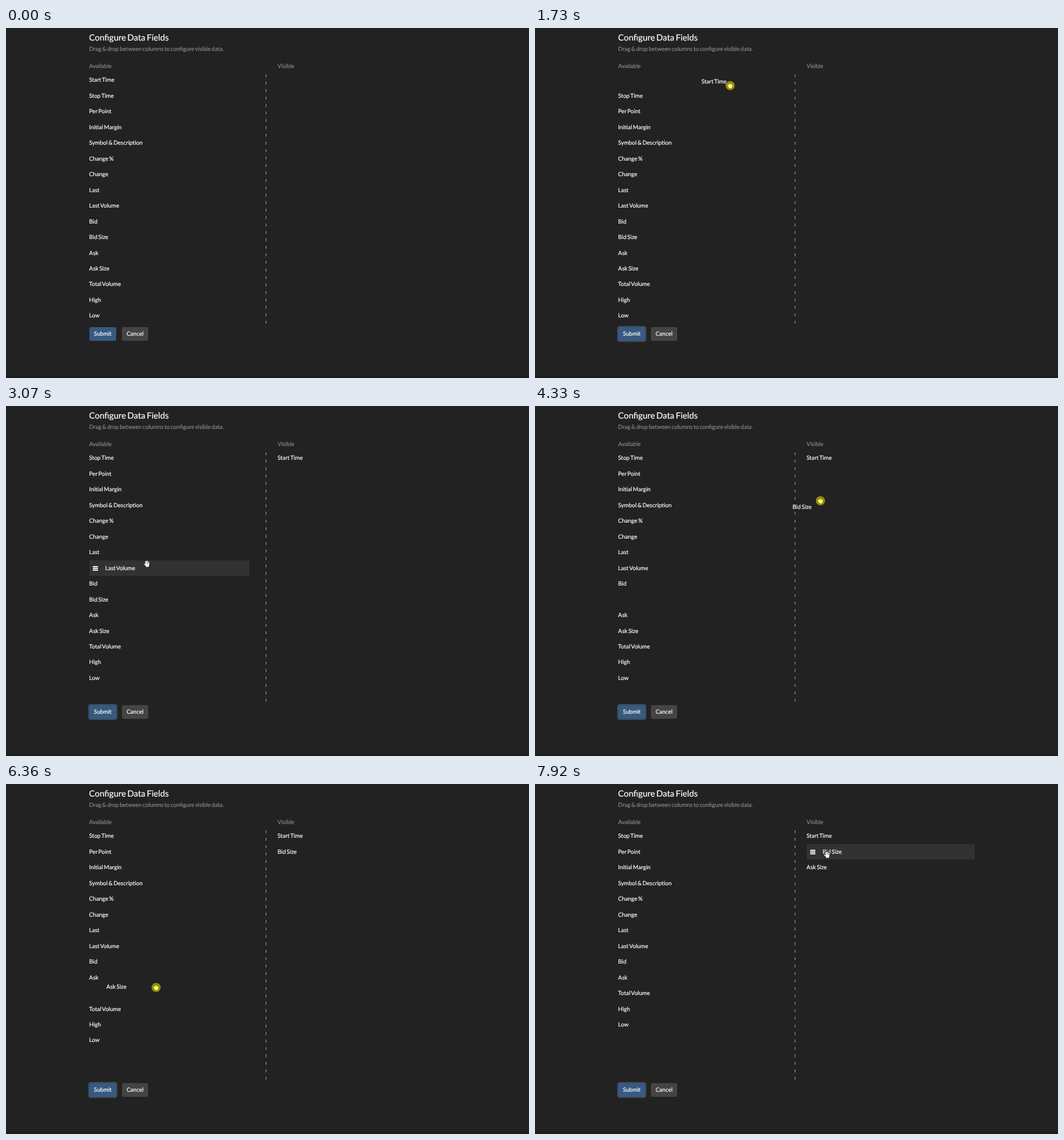
An HTML page that plays this animation: 916 px wide and 612 px high, repeating every 8 s.

```html
<!DOCTYPE html>
<html lang="en">
<head>
<meta charset="utf-8">
<title>Configure Data Fields</title>
<style>
html, body { margin: 0; width: 100%; height: 100%; overflow: hidden; background: #222; }
#stage {
  position: relative; width: 916px; height: 612px; overflow: hidden;
  background: linear-gradient(#222 607px, #1d1d1d 608px);
  color: #fff; font: 10.05px/20px Lato, sans-serif; word-spacing: -.1em;
  -webkit-text-stroke: .2px; text-rendering: geometricPrecision; white-space: nowrap;
}
#stage > * { position: absolute; }
h1 { left: 145.5px; top: 6.5px; margin: 0; font-size: 15.07px; font-weight: 400; word-spacing: -.1em; }
.muted { left: 145.6px; top: 57px; color: #888; }
.hint { top: 27px; }
.right { left: 475.6px; }
.divider {
  left: 455px; top: 81px; width: 1px; height: 436px;
  background: repeating-linear-gradient(#aaa 0 5px, transparent 5px 13.06px);
}
.btn {
  top: 523px; height: 23.5px; line-height: 24px; border-radius: 2.7px;
  text-align: center; background: #444;
}
.submit { left: 146px; width: 47px; background: #375a7f; }
.cancel { left: 203px; width: 46px; }
.focus { box-shadow: 0 0 0 2.1px rgba(85, 115, 146, .5); }
.row { height: 27.47px; line-height: 29.47px; box-sizing: border-box; }
.row.hover { background: #323232; padding-left: 28.2px; }
.row.hover::before {
  content: ""; position: absolute; left: 6.6px; top: 10px; width: 9px; height: 8px;
  background: repeating-linear-gradient(#fff 0 2px, transparent 2px 3px);
}
.row.ghost { z-index: 2; }
#pointer { left: 0; top: 0; z-index: 3; overflow: visible; -webkit-text-stroke: 0; }
#pointer .edge { stroke: #000; stroke-width: 2.9; }
#pointer .skin { stroke: #fff; stroke-width: 1.5; fill: #fff; }
</style>
</head>
<body>
<div id="stage">
  <h1>Configure Data Fields</h1>
  <div class="muted hint">Drag &amp; drop between columns to configure visible data.</div>
  <div class="muted">Available</div>
  <div class="muted right">Visible</div>
  <div class="divider"></div>
  <div class="btn submit">Submit</div>
  <div class="btn cancel">Cancel</div>
  <svg id="pointer" width="1" height="1" stroke-linecap="round" stroke-linejoin="round">
    <defs>
      <path id="open" d="M-2.5 -3.8L-1.7 1M-.5 -5V1M1.6 -4.7V1M3.9 -3.2L3.4 1M-4.7 .4L-2.2 3M-2 1H3.6L2.8 5H-1Z"/>
      <path id="fist" d="M-2.7 -2V1M-.8 -2.8V1M1.2 -2.8V1M3.2 -2V1M-3.8 .6L-2 2.6M-2.4 0H3.2L2.4 3.8H-1.3Z"/>
    </defs>
    <path class="arrow" d="M0 0V10.8L2.5 8.5L4.2 12.4L6 11.6L4.3 7.8H7.6Z" fill="#fff" stroke="#000" stroke-width=".6"/>
    <g class="open"><use href="#open" class="edge"/><use href="#open" class="skin"/></g>
    <g class="fist">
      <use href="#fist" class="edge"/><use href="#fist" class="skin"/>
      <circle r="8" fill="#fff800" fill-opacity=".5"/>
    </g>
  </svg>
</div>
<script>
const LOOP = 8000, ENTER = 70, SETTLE = 250, GRIP = 2.5;
const TOP = 77.35, PITCH = 27.47;
const COLS = [{ x: 145.6, w: 280.4 }, { x: 475.6, w: 294.4 }];
const FIELDS = ['Start Time', 'Stop Time', 'Per Point', 'Initial Margin', 'Symbol & Description',
  'Change %', 'Change', 'Last', 'Last Volume', 'Bid', 'Bid Size', 'Ask', 'Ask Size',
  'Total Volume', 'High', 'Low'];

const DRAGS = [
  { item: 0, press: 1330, start: 1400, drop: 2220 },
  { item: 10, press: 3710, start: 3900, drop: 4770 },
  { item: 12, press: 6230, start: 6280, drop: 7070 }
];

// Where the pointer turns or rests: arrival, x, y, departure if it rests
const STOPS = [
  [ENTER, 836, 580], [470, 195, 172, 710], [860, 187, 114.5], [1120, 193, 98, 1310],
  [2110, 535, 105], [2360, 549.5, 109.5], [3070, 247, 275.5], [3460, 192, 327, 3850],
  [4330, 499.5, 166], [4770, 548, 108], [5580, 292, 309], [6060, 229, 367, 6200],
  [6360, 262.5, 356], [7000, 540, 150], [7280, 557, 148], [7850, 518, 128], [7920, 511.5, 123.5, LOOP]
];
const path = STOPS.flatMap(([t, x, y, leave]) => leave ? [[t, x, y], [leave, x, y]] : [[t, x, y]]);

const stage = document.getElementById('stage');
const pointer = document.getElementById('pointer');
const submit = stage.querySelector('.submit');
const shapes = ['arrow', 'open', 'fist'].map(n => pointer.querySelector('.' + n));
const clamp = v => Math.min(Math.max(v, 0), 1);
const rowTop = n => TOP + n * PITCH;

const rows = FIELDS.map(name => {
  const el = document.createElement('div');
  el.textContent = name;
  stage.append(el);
  return el;
});

// Velocity along one axis; zero at rests and turning points
function slope(i, k) {
  const p = path[i], a = path[i - 1] || p, b = path[i + 1] || p;
  const inner = a !== p && b !== p;
  return inner && (b[k] - p[k]) * (p[k] - a[k]) <= 0 ? 0 : (b[k] - a[k]) / (b[0] - a[0]);
}

function pointAt(t) {
  const i = Math.max(path.findIndex(p => p[0] > t) - 1, 0);
  const a = path[i], b = path[i + 1], d = b[0] - a[0], s = clamp((t - a[0]) / d);
  const at = k => {
    const m = slope(i, k) * d, n = slope(i + 1, k) * d, gap = b[k] - a[k];
    return a[k] + s * (m + s * (3 * gap - 2 * m - n + s * (m + n - 2 * gap)));
  };
  return { x: at(1), y: at(2) };
}

// The label keeps its distance from the pointer, then eases into its slot
function ghostAt(drag, t, from, to) {
  const held = pointAt(drag.press), now = pointAt(Math.min(t, drag.drop));
  const x = COLS[0].x + now.x - held.x - GRIP, y = rowTop(from) + now.y - held.y;
  const k = 1 - (1 - clamp((t - drag.drop) / SETTLE)) ** 3;
  return { x: x + (COLS[1].x - x) * k, y: y + (rowTop(to) - y) * k };
}

function place(el, x, y, w, state) {
  el.className = 'row ' + state;
  el.style.left = x + 'px';
  el.style.top = y + 'px';
  el.style.width = w + 'px';
}

function draw(t) {
  const p = pointAt(t);
  const moved = DRAGS.filter(d => t >= d.drop + SETTLE).map(d => d.item);
  const drag = DRAGS.find(d => t >= d.start && t < d.drop + SETTLE);
  const pressed = DRAGS.some(d => t >= d.press && t < d.drop);
  const lists = [FIELDS.map((_, i) => i).filter(i => !moved.includes(i)), moved];
  let over = false;

  lists.forEach((list, c) => list.forEach((item, n) => {
    const { x, w } = COLS[c], y = rowTop(n);
    if (drag && drag.item === item) {
      const g = ghostAt(drag, t, n, moved.length);
      place(rows[item], g.x, g.y, w, 'ghost');
      return;
    }
    const hit = !drag && t >= ENTER && p.x >= x && p.x < x + w && p.y >= y && p.y < y + PITCH;
    over = over || hit;
    place(rows[item], x, y, w, hit ? 'hover' : '');
  }));

  const shape = pressed ? 2 : over ? 1 : 0;
  shapes.forEach((el, i) => { el.style.display = i === shape ? '' : 'none'; });
  pointer.style.visibility = t < ENTER ? 'hidden' : 'visible';
  pointer.style.transform = `translate(${p.x}px, ${p.y}px)`;
  submit.classList.toggle('focus', t >= DRAGS[0].start);
}

function tick() {
  draw(performance.now() % LOOP);
  requestAnimationFrame(tick);
}
tick();
</script>
</body>
</html>
```
